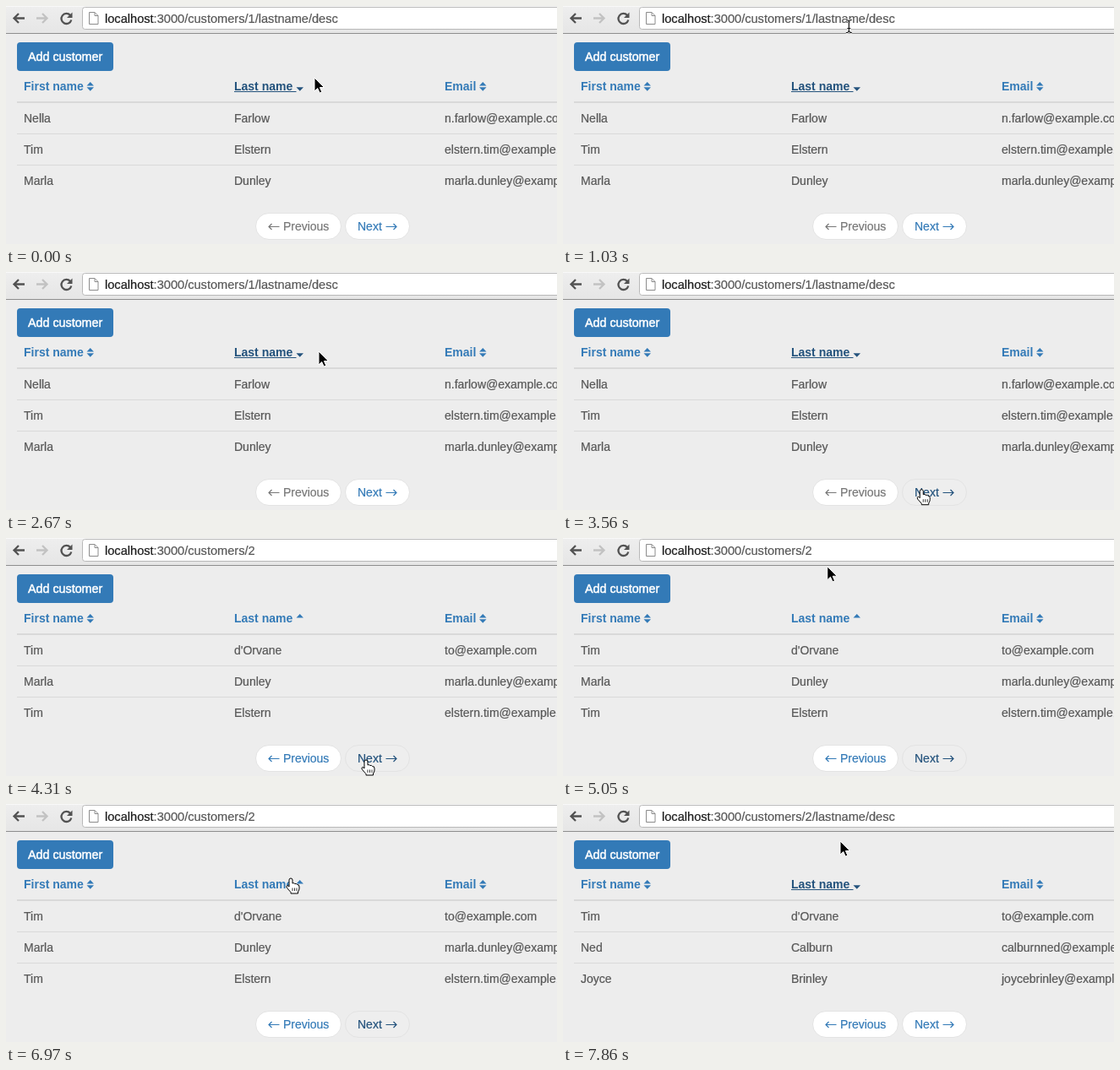
An HTML page for the animation above (8000 ms loop, 652 px wide and 282 px high).

```html
<!DOCTYPE html>
<html lang="en">
<head>
<meta charset="utf-8">
<title>Customers</title>
<style>
  html, body { margin: 0; width: 100%; height: 100%; overflow: hidden; background: #ededed; }
  svg { display: block; width: 652px; height: 282px; color: #585858; }
  text {
    font: 14px "Liberation Sans", Arial, sans-serif; white-space: pre;
    fill: currentColor; stroke: currentColor; stroke-width: .22;
  }
  .url { font-size: 14.6px; }
  .host { color: #1c1c1c; }
  .button { font-size: 14.3px; color: #fff; stroke-width: .5; }
  .head { color: #337ab7; fill: currentColor; }
  .head text { font-weight: bold; stroke: none; }
  .icon { fill: none; stroke: #525252; stroke-width: 2.3; }
  .pill { fill: #fff; stroke: #e3e3e3; }
  .arrow { fill: none; stroke: currentColor; stroke-width: 1.2; }
</style>
</head>
<body>
<svg viewBox="0 0 652 282">
  <defs>
    <linearGradient id="bar" x2="0" y2="1">
      <stop stop-color="#eee"/><stop offset="1" stop-color="#e6e6e6"/>
    </linearGradient>
    <path id="caret" d="M-4.25 0H4.25L0 4.5Z"/>
    <path id="stem" d="M-3.5-7.500Q0-7.5 0-5Q0-7.5 3.5-7.5M0-5V5M-3.5 7.5Q0 7.5 0 5Q0 7.5 3.5 7.5M-2 2.5H2"/>
  </defs>

  <rect width="652" height="32" fill="url(#bar)"/>
  <rect width="652" height="1" fill="#f8f8f8"/>
  <path d="M0 32.5H652" stroke="#8e8e8e"/>
  <rect x="90.5" y="1.5" width="580" height="26" rx="3" fill="#fff" stroke="#b8b8b8"/>
  <path class="icon" d="M22 14.5H10M15 9L9.5 14.5 15 20"/>
  <path class="icon" d="M36 14.5H48M43 9L48.5 14.5 43 20" style="stroke:#c2c2c2"/>
  <path class="icon" d="M76 11A6 6 0 1 0 77.3 16.5"/>
  <path d="M78.5 7.5V14H72Z" fill="#525252"/>
  <path d="M98.5 7.5H105L109 11.5V21.5H98.5ZM105 7.5V11.5H109" fill="#fff" stroke="#8c8c8c"/>
  <text class="url" x="117" y="20"><tspan class="host">localhost</tspan><tspan id="path"></tspan></text>

  <rect x="13" y="43" width="114" height="34" rx="4" fill="#337ab7"/>
  <text class="button" x="26" y="65">Add customer</text>

  <g class="head">
    <text x="21" y="100">First name</text>
    <use href="#caret" transform="translate(99.75 94.5) scale(1 -1)"/>
    <use href="#caret" x="99.75" y="96.3"/>
  </g>
  <g class="head" id="last">
    <text x="270" y="100">Last name</text>
    <use href="#caret" id="sort"/>
    <rect id="line" x="270" y="101" width="73.5" height="1"/>
  </g>
  <g class="head">
    <text x="519" y="100">Email</text>
    <use href="#caret" transform="translate(564.25 94.5) scale(1 -1)"/>
    <use href="#caret" x="564.25" y="96.3"/>
  </g>
  <path d="M13 114H652" stroke="#d9d9d9" stroke-width="2"/>
  <path d="M13 151.5H652M13 188.5H652" stroke="#dadada"/>
  <g id="rows"></g>

  <g id="prev">
    <rect class="pill" x="295.5" y="245.5" width="101" height="31" rx="15.5"/>
    <path class="arrow" d="M323.5 261.5H311M314.5 258L311 261.5 314.5 265"/>
    <text x="327.9" y="266">Previous</text>
  </g>
  <g id="next">
    <rect class="pill" id="pill" x="401.5" y="245.5" width="76" height="31" rx="15.5"/>
    <text x="416" y="266">Next</text>
    <path class="arrow" d="M449.5 261.5H462M458.5 258L462 261.5 458.5 265"/>
  </g>

  <g id="cursor">
    <path id="arrow" d="M0 0V16L3.7 12.5 6.2 18 8.8 17 6.4 11.5H11.5Z" fill="#000" stroke="#fff"/>
    <g id="beam" fill="none">
      <use href="#stem" stroke="#fff" stroke-width="2.6"/>
      <use href="#stem" stroke="#111" stroke-width="1.2"/>
    </g>
    <g id="hand" stroke="#000">
      <path d="M-2 2Q-2 0 0 0 2 0 2 2V6Q4 5 4.8 6.6 7 6 7.6 7.6 10 7 10 10V12Q10 14 8.5 16V18H0V16.5L-4.5 11.5Q-6 9-4 8.6-3 8.5-2 10Z" fill="#fff"/>
      <path d="M2 11.5V15M4.5 11.5V15M7 11.5V15" stroke-width=".8"/>
    </g>
  </g>
</svg>
<script>
const $ = id => document.getElementById(id);
const LOOP = 8000, TICK = 148.3, LAST_TICK = 53;

const person = (first, last, mail) => [first, last, mail + "@example.com"];
const nella = person("Nella", "Farlow", "n.farlow");
const tim = person("Tim", "Elstern", "elstern.tim");
const marla = person("Marla", "Dunley", "marla.dunley");
const orvane = person("Tim", "d'Orvane", "to");
const ned = person("Ned", "Calburn", "calburnned");
const joyce = person("Joyce", "Brinley", "joycebrinley");

const views = [
  { path: "1/lastname/desc", desc: true, rows: [nella, tim, marla] },
  { path: "2", desc: false, rows: [orvane, marla, tim] },
  { path: "2/lastname/desc", desc: true, rows: [orvane, ned, joyce] }
];

// Ticks at which the user clicks and the page answers
const NEXT_CLICK = 27, NEXT_LOAD = 29, SORT_CLICK = 48, SORT_LOAD = 50;

// Pointer stops: tick of arrival, x, y
const stops = [
  [0, 365, 85], [1, 365, 85], [5, 302, 19], [6, 302, 24], [11, 387, 24],
  [13, 357, 15], [14, 320, 16], [18, 370, 94], [21, 370, 94],
  [25, 426, 263], [30, 426, 263], [36, 305, 18], [40, 325, 20],
  [42, 392, 20], [44, 337, 88], [50, 337, 88], [LAST_TICK, 328, 44]
];

const easeOut = f => 1 - (1 - f) ** 2.5;

function pointer(tick) {
  const i = Math.max(1, stops.findIndex(s => s[0] >= tick));
  const [t0, x0, y0] = stops[i - 1], [t1, x1, y1] = stops[i];
  const f = easeOut((tick - t0) / (t1 - t0));
  return [x0 + (x1 - x0) * f, y0 + (y1 - y0) * f];
}

const cells = [0, 1, 2].map(r => [21, 270, 519].map(x => {
  const cell = document.createElementNS("http://www.w3.org/2000/svg", "text");
  cell.setAttribute("x", x);
  cell.setAttribute("y", 138 + 37 * r);
  return $("rows").appendChild(cell);
}));

function draw(ms) {
  const tick = Math.min(LAST_TICK, Math.floor((ms % LOOP + 8) / TICK));
  const page = tick < NEXT_LOAD ? 0 : tick < SORT_LOAD ? 1 : 2;
  const view = views[page];
  const [x, y] = pointer(tick);

  const overNext = x > 401 && x < 478 && y > 245 && y < 277;
  const overHead = x > 270 && x < 352 && y > 85 && y < 104;
  const nextOn = overNext || (tick >= NEXT_CLICK && tick < SORT_CLICK);
  const lastOn = tick < NEXT_CLICK || tick >= SORT_CLICK;

  $("path").textContent = ":3000/customers/" + view.path;
  cells.forEach((row, r) => row.forEach((cell, c) => cell.textContent = view.rows[r][c]));

  $("sort").setAttribute("transform", view.desc ? "translate(347.75 96.3)" : "translate(347.75 94.5) scale(1 -1)");
  $("line").style.display = lastOn ? "" : "none";
  $("last").style.color = lastOn ? "#23527c" : "#337ab7";

  $("prev").style.color = page ? "#337ab7" : "#777";
  $("next").style.color = nextOn ? "#23527c" : "#337ab7";
  $("pill").style.fill = nextOn ? "#eee" : "#fff";

  const shape = y < 30 ? "beam" : overNext || overHead ? "hand" : "arrow";
  for (const id of ["arrow", "beam", "hand"]) $(id).style.display = id === shape ? "" : "none";
  $("cursor").setAttribute("transform", `translate(${x} ${y})`);
}

function loop() {
  draw(performance.now());
  requestAnimationFrame(loop);
}
loop();
</script>
</body>
</html>
```
